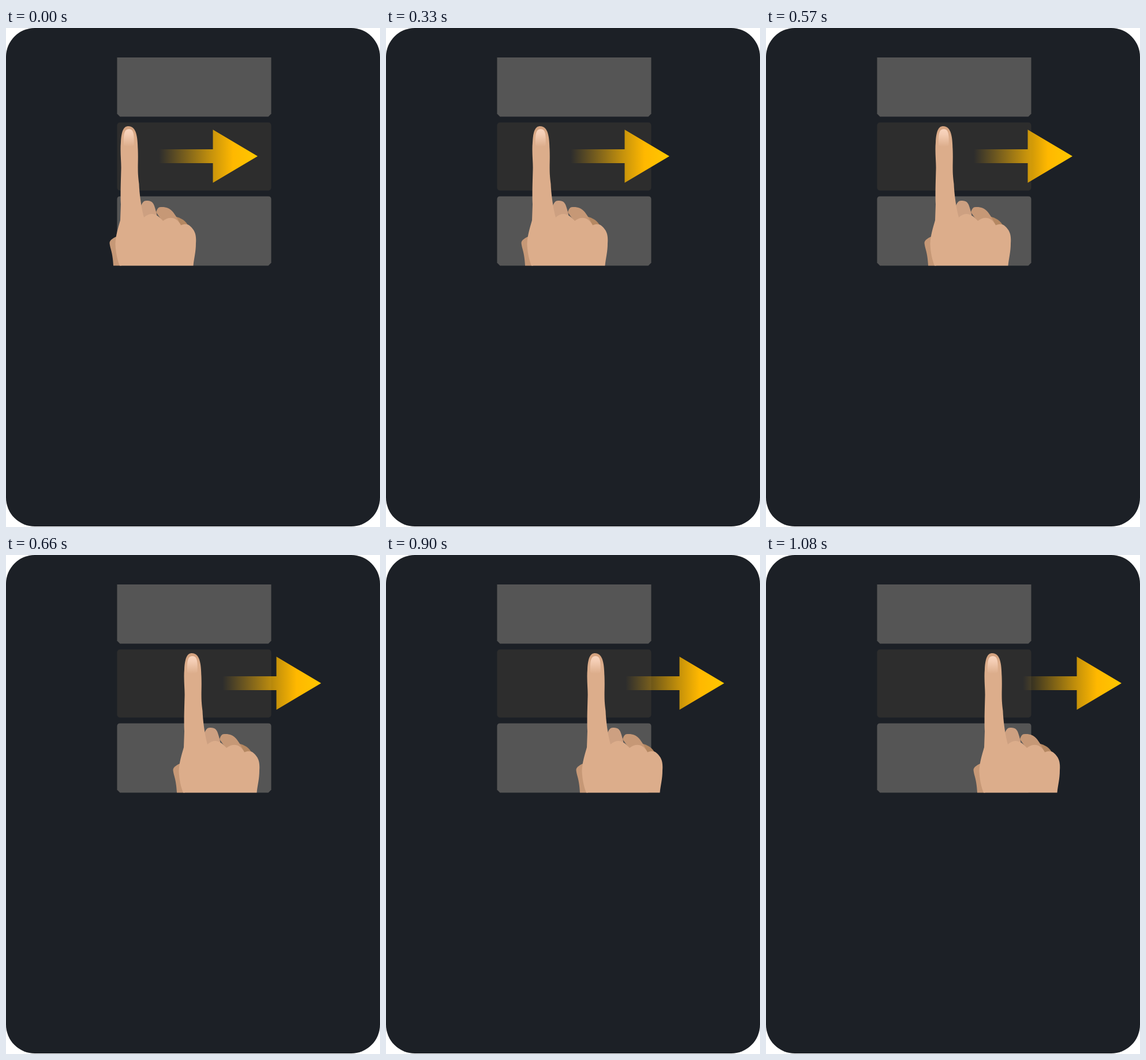
Animation, 648 px wide and 864 px high, one loop 1180 ms. Source, as an HTML page:

```html
<!DOCTYPE html>
<html lang="en">
<head>
<meta charset="utf-8">
<title>Swipe right</title>
<style>
  html, body { margin: 0; width: 100%; height: 100%; overflow: hidden; background: #fff; }
  svg { display: block; width: 648px; height: 864px; }
</style>
</head>
<body>
<svg viewBox="0 0 648 864">
  <defs>
    <linearGradient id="gold" gradientUnits="userSpaceOnUse" x1="265" x2="436" y1="0" y2="0">
      <stop offset="0" stop-color="#ffb800" stop-opacity="0"/>
      <stop offset=".54" stop-color="#ffb800" stop-opacity=".74"/>
      <stop offset=".75" stop-color="#ffb800"/>
      <stop offset=".88" stop-color="#ffc000"/>
      <stop offset="1" stop-color="#ffc800"/>
    </linearGradient>
    <linearGradient id="nail" x1="0" x2="0" y1="0" y2="1">
      <stop offset="0" stop-color="#f9d5bf"/>
      <stop offset=".3" stop-color="#f4cdb4"/>
      <stop offset="1" stop-color="#dcad8b"/>
    </linearGradient>
    <linearGradient id="skin" gradientUnits="userSpaceOnUse" x1="0" x2="0" y1="170" y2="190">
      <stop offset="0" stop-color="#d3a17e"/>
      <stop offset="1" stop-color="#dcad8b"/>
    </linearGradient>
  </defs>

  <rect width="648" height="863" rx="50" fill="#1c2026"/>
  <path d="M192.5 51H459.5V148.5L454.5 153.5H197.5L192.5 148.5Z" fill="#555"/>
  <rect x="192.5" y="163.5" width="267" height="118" rx="5" fill="#2d2d2d"/>
  <path d="M197.5 291.5H454.5Q459.5 291.5 459.5 296.5V406.5L454.5 411.5H197.5L192.5 406.5V296.5Q192.5 291.5 197.5 291.5Z" fill="#555"/>

  <g id="swipe">
    <path d="M265 210H358.5V176L436 222L358.5 268V234H265Z" fill="url(#gold)"/>

    <!-- Thumb and folded fingers, behind the hand -->
    <path d="M192 361C187 363 179.500 367 179.500 372C180 381 185 388 186 411.500H200Z" fill="#c69876"/>
    <path d="M289 326C299 327 309 331 315 341L303 345Z" fill="#b58862"/>
    <path d="M260 319C262 313 264 310 268 310C285 309 291 318 303 341L275 340Z" fill="#c69876"/>
    <path d="M233 310C236 302 239 299 243 299C255 299 256 303 261 322L262 335H236Z" fill="#cda081"/>

    <path d="M212 170C204 170 200 178 199 198C197.500 215 200 233 199.500 245C199 265 198 290 199 305L198 333C194 347 190 359 189.500 374C190 388 193 402 197 411.500H324.500C326 397 329 388 329 373C330 359 328 351 319 343C315 339 309 339 303 341.500C296 328 284 325 272 334C262 322 251 317 239 328C234 310 231 285 230.500 270C227 245 229.500 235 228.500 210C228 190 226.500 170 212 170Z" fill="url(#skin)"/>
    <path d="M204 203C203.500 186 204 175 213 175C222 175 222 186 221.500 203Q213 208 204 203Z" fill="url(#nail)"/>
  </g>
</svg>
<script>
  const LOOP = 1180, STEP = 30, LAST = 36, STRIDE = 5;
  const swipe = document.getElementById('swipe');
  const start = performance.now();

  function draw() {
    const t = (performance.now() - start) % LOOP;
    const step = Math.min(LAST, Math.floor(t / STEP));
    swipe.setAttribute('transform', `translate(${step * STRIDE} 0)`);
    requestAnimationFrame(draw);
  }
  draw();
</script>
</body>
</html>
```
